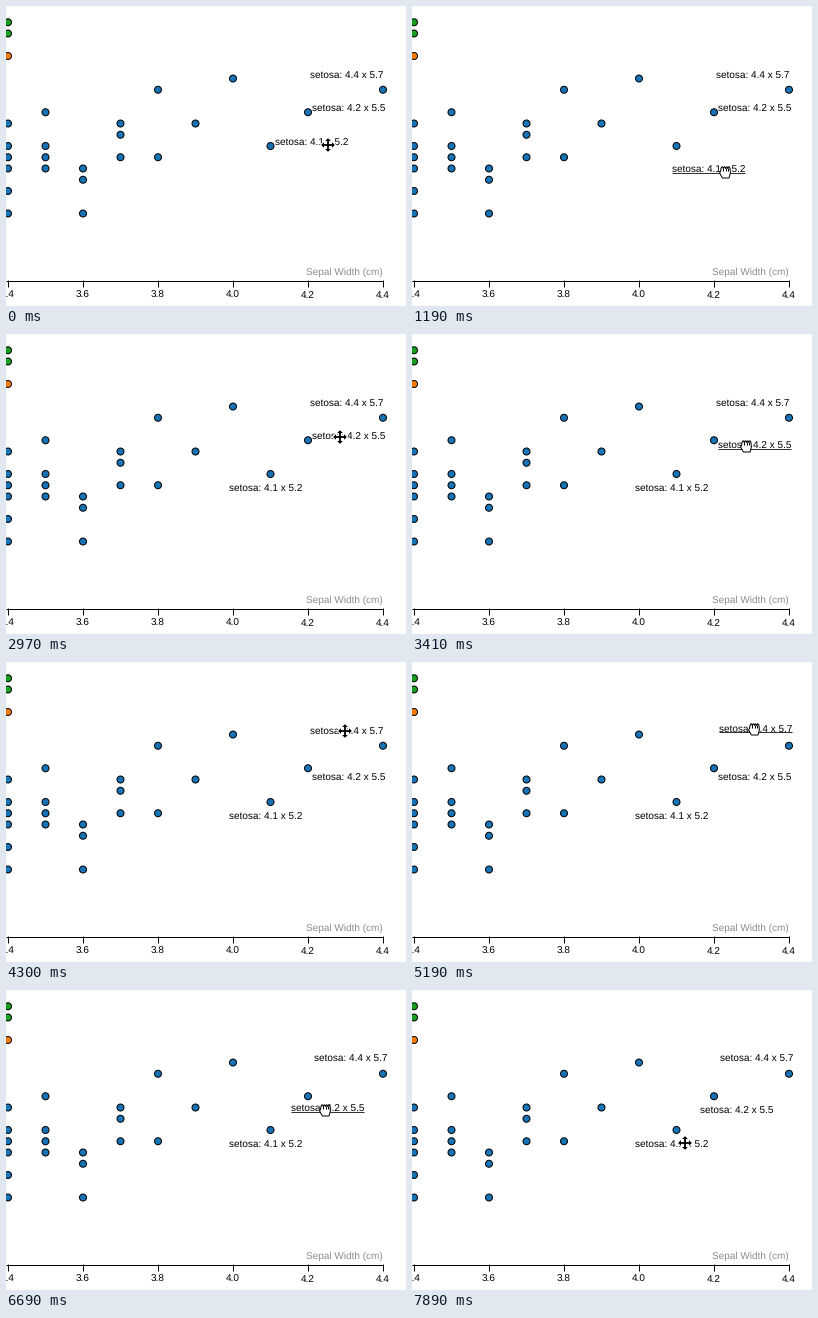
These frames come from a looping animation (400 by 300 pixels, 8000 ms). A matplotlib script:

```python
import numpy as np
import matplotlib.pyplot as plt
from matplotlib.animation import FuncAnimation
from matplotlib.patches import Circle, Polygon

W, H, DPI = 400, 300, 100
LOOP, INTERVAL = 8000, 20
STEP = 148.5  # ms between changes of the picture
PX = 72 / DPI  # points per pixel

plt.rcParams["font.family"] = "Liberation Sans"
plt.rcParams["text.hinting"] = "none"

BLUE, ORANGE, GREEN = "#1673b6", "#ff7d08", "#169f1f"

# sepal width -> sepal lengths
SETOSA = {
    3.4: (5.4, 5.2, 5.1, 5.0, 4.8, 4.6),
    3.5: (5.5, 5.2, 5.1, 5.0),
    3.6: (5.0, 4.9, 4.6),
    3.7: (5.4, 5.3, 5.1),
    3.8: (5.7, 5.1),
    3.9: (5.4,),
    4.0: (5.8,),
    4.1: (5.2,),
    4.2: (5.5,),
    4.4: (5.7,),
}

# label text and its starting baseline
LABELS = [
    ("setosa: 4.1 x 5.2", 269, 140),
    ("setosa: 4.2 x 5.5", 306, 106),
    ("setosa: 4.4 x 5.7", 304, 72),
]
LABEL_W = 73.4

# pointer strokes: first step, last step, held label, end point, vertical bow
POINTER_START = (322, 139)
STROKES = [
    (6, 14, 0, (276, 157), 50),
    (14, 20, None, (334, 103), 0),
    (20, 23, 1, (334, 116), 0),
    (25, 29, None, (339, 69), 0),
    (31, 35, 2, (343, 68), -14),
    (35, 38, None, (340, 117), 0),
    (40, 45, 1, (319, 120), 0),
    (45, 48, 1, (322, 122), 0),
    (50, 53, None, (273, 153), 0),
]


def ease(u):
    return u - 0.05 * np.sin(2 * np.pi * u)


def state(step):
    """Pointer, label positions and held label after the given step."""
    pos = np.array(POINTER_START, float)
    places = [np.array(label[1:], float) for label in LABELS]
    held = None
    for first, last, label, end, bow in STROKES:
        if step <= first:
            break
        u = min((step - first) / (last - first), 1)
        move = (np.array(end) - pos) * ease(u)
        move[1] += bow * np.sin(np.pi * u) * (1 - u) ** 1.5
        move = move.round()
        pos += move
        held = label
        if label is not None:
            places[label] += move
    return pos, places, held


def sx(width):
    return 2 + 375 * (width - 3.4)


def sy(length):
    return 140 - 112.5 * (length - 5.2)


fig = plt.figure(figsize=(W / DPI, H / DPI), dpi=DPI, facecolor="white")
ax = fig.add_axes([0, 0, 1, 1])
ax.set_xlim(0, W)
ax.set_ylim(H, 0)
ax.axis("off")


def text(x, y, s, **kw):
    return ax.text(x, y, s, fontsize=10 * PX, va="baseline", **kw)


def line(xs, ys, **kw):
    return ax.plot(xs, ys, lw=PX, solid_capstyle="butt", **{"color": "black", **kw})[0]


def dot(width, length, color):
    ax.add_patch(Circle((sx(width), sy(length)), 3.5, fc=color, ec="black", lw=PX, zorder=2))


# axis
line([0, 377], [274.5, 274.5])
for value in np.arange(3.4, 4.5, 0.2):
    x = round(sx(value))
    line([x - 0.5] * 2, [274, 281])
    text(x, 292, f"{value:.1f}", ha="center")
text(377, 269, "Sepal Width (cm)", ha="right", color="#8c8c8c")

# points
for width, lengths in SETOSA.items():
    for length in lengths:
        dot(width, length, BLUE)
for length, color in ((6.0, ORANGE), (6.2, GREEN), (6.3, GREEN)):
    dot(3.4, length, color)

labels = [text(x, y, s, zorder=3) for s, x, y in LABELS]
underline = line([], [], color="#333333", zorder=3)

# four-way arrow: one arm turned by quarter circles
ARM = np.array([(-0.9, -0.9), (-0.9, -4), (-2.8, -4), (0, -6.8), (2.8, -4), (0.9, -4)])
CROSS = np.vstack([ARM @ np.array([(c, s), (-s, c)])
                   for c, s in ((1, 0), (0, 1), (-1, 0), (0, -1))])

# closed hand: four knuckle bumps above a tapered palm
t = np.linspace(0, 1, 33)
BUMPS = np.column_stack([-4 + 9 * t, -3.6 - 1.6 * np.abs(np.sin(4 * np.pi * t))])
FIST = np.vstack([BUMPS, [(5.4, 1), (4, 6), (-2.6, 6), (-5.4, 1), (-4.4, -0.8)]])
FOLDS = [-4 + 9 * k / 4 for k in (1, 2, 3)]


def shape(points, **kw):
    return ax.add_patch(Polygon(points, closed=True, joinstyle="round", **kw))


halo = shape(CROSS, fc="white", ec="white", lw=2.2 * PX, zorder=4)
cross = shape(CROSS, fc="black", ec="none", zorder=5)
fist = shape(FIST, fc="white", ec="black", lw=PX, zorder=4)
folds = [line([], [], zorder=5) for _ in FOLDS]


def update(frame):
    step = int((frame + 0.5) * INTERVAL / STEP)
    (cx, cy), places, held = state(step)
    grabbing = held is not None

    for label, place in zip(labels, places):
        label.set_position(place)
    underline.set_visible(grabbing)
    if grabbing:
        x, y = places[held]
        underline.set_data([x, x + LABEL_W], [y - 0.5, y - 0.5])

    for part in (halo, cross):
        part.set_xy(CROSS + (cx, cy))
        part.set_visible(not grabbing)
    fist.set_xy(FIST + (cx, cy))
    fist.set_visible(grabbing)
    for fold, dx in zip(folds, FOLDS):
        fold.set_data([cx + dx] * 2, [cy - 4, cy - 1])
        fold.set_visible(grabbing)
    return [*labels, underline, halo, cross, fist, *folds]


anim = FuncAnimation(fig, update, frames=LOOP // INTERVAL, interval=INTERVAL,
                     repeat=True, repeat_delay=0, blit=False)
plt.show()
```
